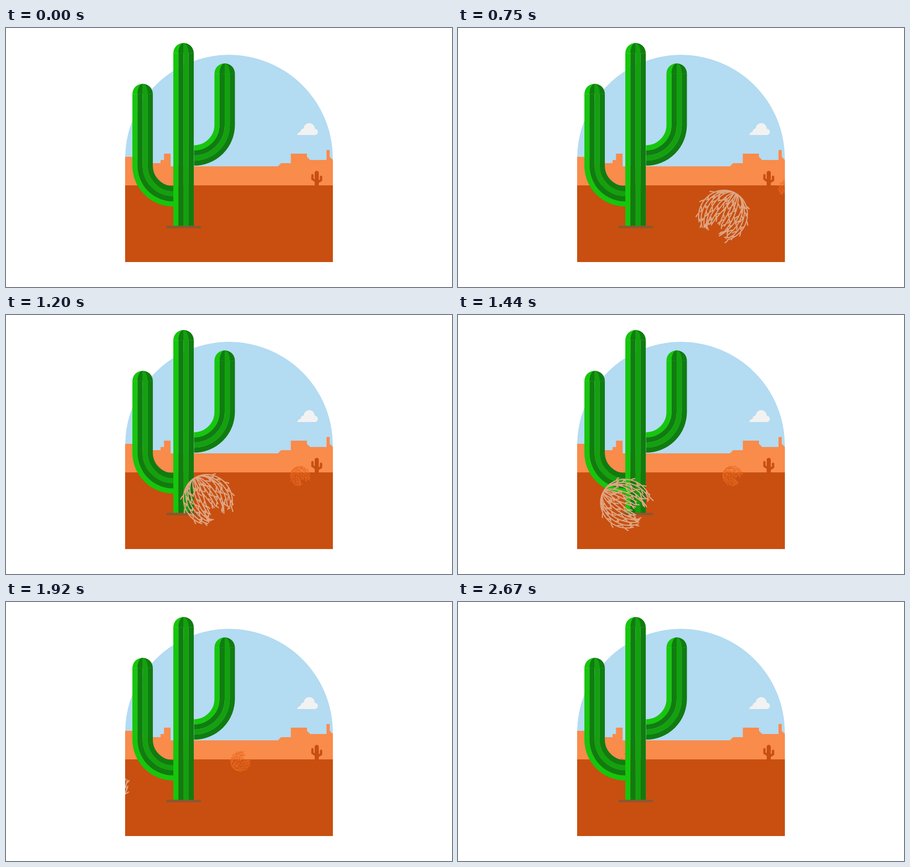
An HTML page with a canvas that plays this animation: 981 by 571 pixels, repeating every 2.7 s.

```html
<!DOCTYPE html>
<html lang="en">
<head>
<meta charset="utf-8">
<title>Desert</title>
<style>
  html, body { margin: 0; height: 100%; overflow: hidden; background: #fff; }
  canvas { display: block; }
</style>
</head>
<body>
<canvas id="stage" width="981" height="571"></canvas>
<script>
const ctx = document.getElementById('stage').getContext('2d');
const LOOP = 2700, STEP = 30;
const LIGHT = '#16c60c', DARK = '#107c10', MID = '#13a10e';
const STRIPES = [LIGHT, DARK, MID, DARK];
const STRIPE = 11.25, BEND = 67.5;

const frameShape = new Path2D('M262 516V287.5A228.5 228.5 0 0 1 719 287.5V516Z');
const mesa = new Path2D('M262 284H300V298H340V291H347.5V277H362V305H598L605 298H626.5V277H662V284L669 291H705V269H712V284L719 291V348H262Z');
const cloud = new Path2D('M640.5 236A8 8 0 0 1 648 229A7 7 0 0 1 655 221.5A12 12 0 0 1 679 222A7 7 0 0 1 679 236Z');
const farTrunk = new Path2D('M679 347V319.5a4.5 4.5 0 0 1 9 0V347Z');
const farArms = new Path2D('M674 324.5V333L683 339M693 328V335.5L684 341');

function seeded(seed) {
  return () => (seed = seed * 16807 % 2147483647) / 2147483647;
}

// Stems follow the meridians of a ball from one root and carry alternating twigs.
function makeWeed() {
  const random = seeded(77), path = new Path2D();
  for (let i = 0; i < 15; i++) {
    const u = i / 7 - 1;
    const end = 1.75 + 0.6 * Math.abs(u) + 0.45 * random();
    const lean = (random() - 0.5) * 12;
    const at = a => [53 * u * Math.sin(a) + lean * Math.sin(2 * a) * (1 - u * u), 6 - 56 * Math.cos(a)];
    path.moveTo(...at(0.06));
    for (let a = 0.12; a < end; a += 0.06) path.lineTo(...at(a));
    let side = i % 2 ? 1 : -1;
    for (let a = 0.65 + 0.25 * random(); a < end; a += 0.2 + 0.12 * random()) {
      const [x, y] = at(a), [nx, ny] = at(a + 0.02);
      const heading = Math.atan2(ny - y, nx - x), size = 7 + 4 * random();
      const far = heading + side * 0.55, near = heading + side * 0.8;
      path.moveTo(x, y);
      path.quadraticCurveTo(x + size * 0.5 * Math.cos(near), y + size * 0.5 * Math.sin(near),
        x + size * Math.cos(far), y + size * Math.sin(far));
      side = -side;
    }
  }
  return path;
}
const weed = makeWeed();

function fill(path, color) {
  ctx.fillStyle = color;
  ctx.fill(path);
}

// Rounded top: the two middle stripes taper to a point.
function cap(x, y) {
  const half = (rx, color, left) => {
    const shape = new Path2D();
    shape.ellipse(x, y, rx, 22.5, 0, Math.PI / 2, Math.PI * 1.5, !left);
    ctx.save();
    ctx.beginPath();
    ctx.rect(x - 30, y - 30, 60, 30.3);
    ctx.clip();
    fill(shape, color);
    ctx.restore();
  };
  half(22.5, LIGHT, true);
  half(22.5, DARK, false);
  half(STRIPE, DARK, true);
  half(STRIPE, MID, false);
}

// bend: 0 straight, 1 curves to the right, -1 curves to the left.
function column(x, top, bottom, bend) {
  ctx.lineWidth = STRIPE;
  STRIPES.forEach((color, i) => {
    const offset = (i - 1.5) * STRIPE;
    ctx.strokeStyle = color;
    ctx.beginPath();
    ctx.moveTo(x + offset, top);
    ctx.lineTo(x + offset, bottom);
    if (bend) {
      ctx.arc(x + bend * BEND, bottom, BEND - bend * offset,
        bend > 0 ? Math.PI : 0, Math.PI / 2, bend > 0);
    }
    ctx.stroke();
  });
  cap(x, top);
}

// Parabolic hop between ground contacts.
function hop(t, contact, period, height) {
  const p = ((t - contact) / period % 1 + 1) % 1;
  return 4 * p * (1 - p) * height;
}

function drawWeed(t, x, y, scale, color) {
  ctx.save();
  ctx.clip(frameShape);
  ctx.translate(x, y);
  ctx.rotate((975 - t) / LOOP * 2 * Math.PI);
  ctx.scale(scale, scale);
  ctx.lineWidth = 2.5;
  ctx.lineCap = ctx.lineJoin = 'round';
  ctx.strokeStyle = color;
  ctx.stroke(weed);
  ctx.restore();
}

function landscape() {
  ctx.save();
  ctx.clip(frameShape);
  fill(frameShape, '#b3dbf2');
  fill(cloud, '#f2f2f2');
  fill(mesa, '#f98b4b');
  ctx.fillStyle = '#c84f10';
  ctx.fillRect(262, 347, 457, 169);
  fill(farTrunk, '#c84f10');
  ctx.strokeStyle = '#c84f10';
  ctx.lineWidth = 5;
  ctx.lineCap = 'round';
  ctx.stroke(farArms);
  ctx.restore();
}

function cactus() {
  column(300.5, 145.5, 303.5, 1);
  column(481, 100.5, 213.5, -1);
  column(390.5, 55.5, 436.5, 0);
  ctx.fillStyle = '#8e562e';
  ctx.beginPath();
  ctx.roundRect(352, 436, 77, 5.5, 2.75);
  ctx.fill();
}

function draw(now) {
  const t = Math.floor(now % LOOP / STEP) * STEP;
  ctx.clearRect(0, 0, 981, 571);
  landscape();
  drawWeed(t, 514 - 0.183 * (t - 1920), 361 - hop(t, 307, 675, 8.5), 0.39, '#e8681f');
  cactus();
  drawWeed(t, 441 - 0.322 * (t - 1200), 428 - hop(t, 635, 725, 38), 1, '#dfa582');
}

let start;
function tick(now) {
  start ??= now;
  draw(now - start);
  requestAnimationFrame(tick);
}
requestAnimationFrame(tick);
</script>
</body>
</html>
```
